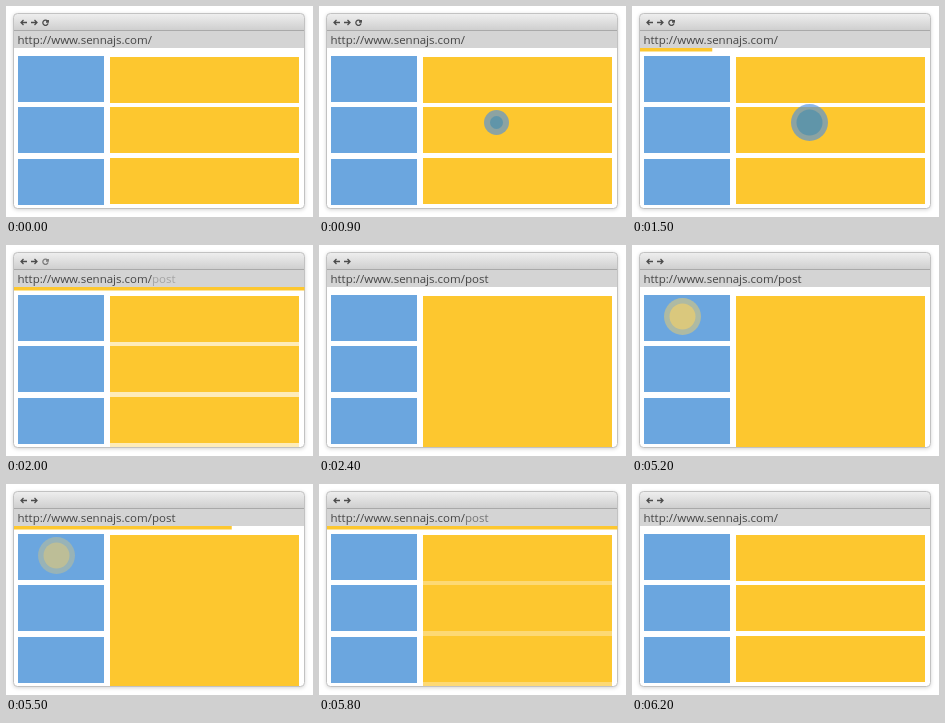
An HTML page with a canvas for the animation above (8.2 s loop, 307 px wide and 211 px high).

```html
<!DOCTYPE html>
<html>
<head>
<meta charset="utf-8">
<style>
  html, body { margin: 0; width: 100%; height: 100%; overflow: hidden; background: #fff; }
  canvas { display: block; width: 307px; height: 211px; }
</style>
</head>
<body>
<canvas id="stage" width="307" height="211"></canvas>
<script>
const ctx = document.getElementById('stage').getContext('2d');
const YELLOW = '#fdc72f', BLUE = '#6ba6df', TEXT = '#454545';
const LOOP = 8200, TICK = 100;
const clamp = v => Math.max(0, Math.min(1, v));

function box(x, y, w, h, fill, alpha = 1) {
  ctx.globalAlpha = alpha;
  ctx.fillStyle = fill;
  ctx.fillRect(x, y, w, h);
  ctx.globalAlpha = 1;
}

function disc(x, y, r, fill) {
  ctx.fillStyle = fill;
  ctx.beginPath();
  ctx.arc(x, y, r, 0, 7);
  ctx.fill();
}

function stroke(path, alpha = 1) {
  ctx.globalAlpha = alpha;
  ctx.strokeStyle = '#4c4c4c';
  ctx.lineWidth = 1.3;
  ctx.stroke(new Path2D(path));
  ctx.globalAlpha = 1;
}

function windowShape() {
  ctx.beginPath();
  ctx.roundRect(7.5, 7.5, 291, 195, 4);
}

function drawWindow() {
  ctx.save();
  ctx.shadowColor = 'rgba(0,0,0,.2)';
  ctx.shadowBlur = 4;
  ctx.shadowOffsetY = 1;
  ctx.fillStyle = '#fff';
  windowShape();
  ctx.fill();
  ctx.restore();

  ctx.save();
  windowShape();
  ctx.clip();
  const bar = ctx.createLinearGradient(0, 8, 0, 24);
  bar.addColorStop(0, '#eeeeee');
  bar.addColorStop(1, '#cfcfcf');
  box(7, 7, 292, 17, bar);
  box(7, 24, 292, 1, '#a9a9a9');
  box(7, 25, 292, 17, '#d4d4d4');
  ctx.restore();
  ctx.strokeStyle = '#c2c2c2';
  ctx.lineWidth = 1;
  windowShape();
  ctx.stroke();
}

// Pulse that grows over nine ticks, then fades while the page loads.
function drawTap(time, start, x, y, outer, inner) {
  if (time < start || time >= start + 1300) return;
  const grow = clamp((time - start) / 800);
  ctx.globalAlpha = 1 - clamp((time - start - 1000) / 300);
  disc(x, y, 6.5 + 12 * grow, outer);
  disc(x, y, 13 * grow, inner);
  ctx.globalAlpha = 1;
}

function drawLoadBar(time, start) {
  const step = (time - start) / TICK + 1;
  if (step < 1 || step >= 10) return;
  box(8, 42, 291 * clamp(step / 4) - 0.5, 3.5, YELLOW, clamp((10 - step) / 4));
}

function draw(time) {
  const opened = clamp((time - 1800) / 600);
  const closed = clamp((time - 5600) / 600);
  const post = opened - closed;

  ctx.clearRect(0, 0, 307, 211);
  drawWindow();

  stroke('M21 16.5H15M17.5 14L15 16.5L17.5 19');
  stroke('M25 16.5H31M28.5 14L31 16.5L28.5 19');
  stroke('M41.5 15.2A2.6 2.6 0 1 0 42 17.3M42.3 14V16H40', 1 - opened);

  ctx.font = '11.5px "Open Sans", sans-serif';
  ctx.fillStyle = TEXT;
  const url = 'http://www.sennajs.com/';
  ctx.fillText(url, 11.5, 38);
  ctx.globalAlpha = post;
  ctx.fillText('post', 11.5 + ctx.measureText(url).width, 38);
  ctx.globalAlpha = 1;

  for (const y of [50, 101, 153]) box(12, y, 86, 46, BLUE);
  for (const y of [51, 101, 152]) box(104, y, 189, 46, YELLOW);
  for (const [y, h] of [[97, 4], [147, 5], [198, 4]]) box(104, y, 189, h, YELLOW, post);

  drawLoadBar(time, 1500);
  drawLoadBar(time, 5300);
  drawTap(time, 500, 177.5, 116.5, 'rgba(80,145,225,.65)', 'rgba(72,142,174,.65)');
  drawTap(time, 4400, 50.5, 71.5, 'rgba(255,210,90,.45)', 'rgba(255,212,95,.55)');
}

function frame() {
  const time = performance.now() % LOOP;
  draw(Math.floor(time / TICK) * TICK);
  requestAnimationFrame(frame);
}
frame();
</script>
</body>
</html>
```
